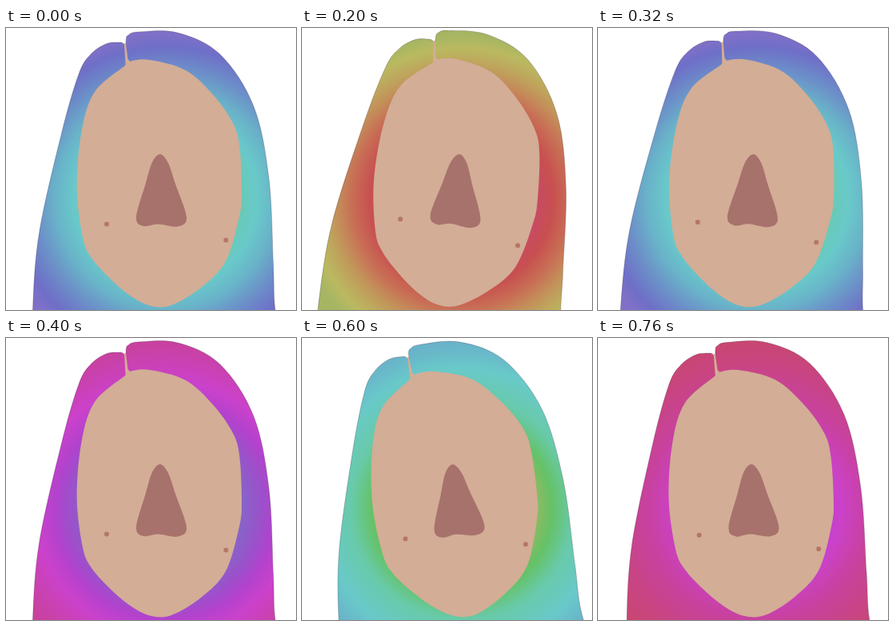
Recreate the animation shown at these times as an HTML page with a canvas. Size 363 by 353 pixels, loop 800 ms.

```html
<!DOCTYPE html>
<html lang="en">
<head>
<meta charset="utf-8">
<title>Swaying head</title>
<style>
  html, body { margin: 0; width: 100%; height: 100%; overflow: hidden; background: #fff; }
  canvas { display: block; }
</style>
</head>
<body>
<canvas id="stage" width="363" height="353"></canvas>
<script>
const ctx = document.getElementById('stage').getContext('2d');
const STEP = 40, STEPS = 20;
const SKIN = '#d3ad96', NOSE = '#a8726c', DOT = '#b57767';

// Rainbow keys: hue, saturation, lightness; the hue keeps rising
const RAINBOW = [
  [251, 44, 61], [289, 58, 53], [318, 55, 52], [339, 54, 53],
  [374, 51, 56], [432, 36, 55], [520, 48, 60], [554, 47, 60]
];
const PERIOD = RAINBOW.length;

// Closed smooth curve through a few points
function smooth(text) {
  const pts = text.trim().split(/\s+/).map(p => p.split(',').map(Number));
  const n = pts.length, at = i => pts[(i + n) % n], path = new Path2D();
  path.moveTo(...pts[0]);
  for (let i = 0; i < n; i++) {
    const [a, b, c, d] = [at(i - 1), at(i), at(i + 1), at(i + 2)];
    path.bezierCurveTo(
      b[0] + (c[0] - a[0]) / 6, b[1] + (c[1] - a[1]) / 6,
      c[0] - (d[0] - b[0]) / 6, c[1] - (d[1] - b[1]) / 6, c[0], c[1]);
  }
  path.closePath();
  return path;
}

const hair = smooth(`148.5,22 146.5,19 141,18 125,20 106,33 91,58 69.5,132 41.5,257 33.5,353
  34,420 34,500 340,500 349,420 337,353 334.5,295 329,188 310,98 268,33 215,6 165,5 153,9
  150.5,13 150,21`);
const face = smooth(`149,47 111,80 94.5,130 88.7,200 96,262 106.5,287 128.5,312 154,334
  180,347.5 207,347 244,325 275,292 292,236 295,205 292.5,150 284.5,120 260,84.5 225,53
  180,40 155,42`);
const nose = smooth(`193,158 183,168 174.7,195 163,237 172,248 190,245.5 215,248.5 226,237
  212,195 203,169`);
const parting = new Path2D('M148 19H150L152.5 39L156 43L150 49L149.5 44Z');

function rainbow(pos) {
  const u = (pos % PERIOD + PERIOD) % PERIOD, i = Math.floor(u);
  const a = RAINBOW[i], b = RAINBOW[(i + 1) % PERIOD];
  const [h, s, l] = a.map((v, c) => {
    const turn = c === 0 && b[0] < v ? 360 : 0;
    return v + (b[c] + turn - v) * (u - i);
  });
  return `hsl(${h}, ${s}%, ${l}%)`;
}

// Colours lag behind the outer rim towards the face
function hairFill(phase) {
  const g = ctx.createRadialGradient(200, 214, 95, 200, 214, 208);
  for (let k = 0; k <= 1; k += 1 / 32) {
    g.addColorStop(k, rainbow(phase - 1.75 * (1 - k) ** 1.15));
  }
  return g;
}

function fill(path, color) {
  ctx.fillStyle = color;
  ctx.fill(path);
}

function dot(x, y) {
  const path = new Path2D();
  path.arc(x, y, 3, 0, 2 * Math.PI);
  fill(path, DOT);
}

// Triangle wave in degrees: 0, +5, 0, -5
const sway = i => 5 - Math.abs((i + 5) % STEPS - 10);

function draw(i) {
  ctx.resetTransform();
  ctx.fillStyle = '#fff';
  ctx.fillRect(0, 0, 363, 353);
  ctx.translate(195, 209);
  ctx.rotate(sway(i) * Math.PI / 180);
  ctx.translate(-195, -209);
  fill(hair, hairFill(i % PERIOD));
  ctx.lineWidth = 0.7;
  ctx.strokeStyle = 'rgba(40,20,40,.35)';
  ctx.stroke(hair);
  fill(face, SKIN);
  fill(parting, SKIN);
  fill(nose, NOSE);
  dot(126, 245.5);
  dot(275.3, 265.5);
}

const start = performance.now();
function tick() {
  draw(Math.floor((performance.now() - start) / STEP) % STEPS);
  requestAnimationFrame(tick);
}
tick();
</script>
</body>
</html>
```
